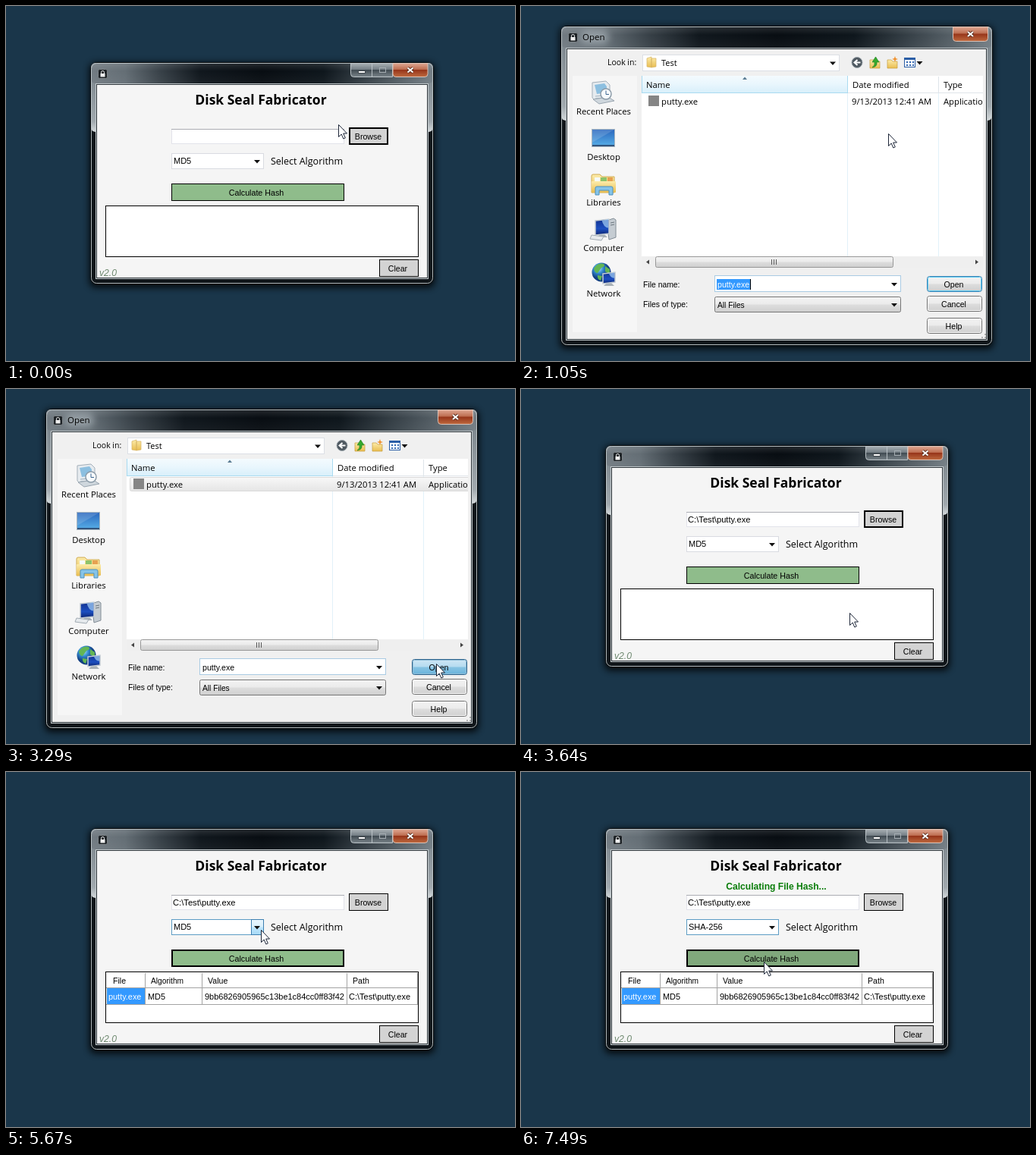
These frames come from a looping animation (671x468 px, 8000 ms). An HTML page:

```html
<!DOCTYPE html>
<html lang="en">
<head>
<meta charset="utf-8">
<title>Disk Seal Fabricator</title>
<style>
  html, body { margin: 0; height: 100%; overflow: hidden; background: #1a364a; }
  svg { display: block; width: 100%; height: 100%; }
  text { font-family: "Liberation Sans", Arial, sans-serif; white-space: pre; }
  .ui { font-family: "Open Sans", "Noto Sans", sans-serif; }
</style>
</head>
<body>
<svg id="stage" viewBox="0 0 671 468"></svg>
<script>
const STEP = 70, LOOP = 8000;

// Markup helpers
const rect = (x, y, w, h, fill, extra = '') =>
  `<rect x="${x}" y="${y}" width="${w}" height="${h}" fill="${fill}" ${extra}/>`;
const box = (x, y, w, h, fill, stroke, extra = '') =>
  rect(x + .5, y + .5, w - 1, h - 1, fill, `stroke="${stroke}" ${extra}`);
const path = (d, fill, extra = '') => `<path d="${d}" fill="${fill}" ${extra}/>`;
const line = (d, stroke, width = 1) => path(d, 'none', `stroke="${stroke}" stroke-width="${width}"`);
const text = (x, y, str, size = 10.6, extra = '') =>
  `<text x="${x}" y="${y}" font-size="${size}" ${extra}>${str}</text>`;
const ui = (x, y, str, size = 11.25, extra = '') => text(x, y, str, size, `class="ui" ${extra}`);
const mid = 'text-anchor="middle"';
const group = (id, body, extra = '') => `<g id="${id}" ${extra}>${body}</g>`;
const arrow = (x, y) => path(`M${x} ${y}h8l-4 4.5z`, '#111');
const gradient = (id, stops, vertical = true) =>
  `<linearGradient id="${id}" x2="${vertical ? 0 : 1}" y2="${vertical ? 1 : 0}">` +
  stops.map(([at, color, opacity = 1]) =>
    `<stop offset="${at}" stop-color="${color}" stop-opacity="${opacity}"/>`).join('') +
  '</linearGradient>';

const defs = `<defs>
  ${gradient('glass', [[0, '#727b82'], [.1, '#646e75'], [.2, '#394249'], [.32, '#10171d'],
    [.5, '#080d12'], [.68, '#0e161c'], [.8, '#343e45'], [1, '#747e85']], false)}
  ${gradient('sheen', [[0, '#fff', .12], [.4, '#fff', 0], [1, '#fff', .04]])}
  ${gradient('shine', [[0, '#747e85'], [.85, '#a1a9ae'], [1, '#d5dadc']])}
  ${gradient('red', [[0, '#e0a893'], [.45, '#bd6d50'], [.5, '#97351a'], [1, '#bf6a3f']])}
  ${gradient('caption', [[0, '#aab1b5'], [.45, '#747e85'], [.5, '#424c53'], [1, '#7a848a']])}
  ${gradient('button', [[0, '#f3f3f3'], [.48, '#ebebeb'], [.52, '#dddddd'], [1, '#cfcfcf']])}
  ${gradient('hot', [[0, '#eaf6fd'], [.48, '#d9f0fc'], [.52, '#bee6fd'], [1, '#a7d9f5']])}
  ${gradient('pressed', [[0, '#cfe7f5'], [.48, '#b5dbf0'], [.52, '#87c3e3'], [1, '#68b3db']])}
  ${gradient('picked', [[0, '#dcebfc'], [1, '#c1dbfc']])}
  ${gradient('hover', [[0, '#fafbfd'], [1, '#ebf3fd']])}
  ${gradient('idle', [[0, '#f8f8f8'], [1, '#e5e5e5']])}
  ${gradient('sorted', [[0, '#f4fbfe'], [.5, '#e9f6fd'], [1, '#d8effa']])}
  ${gradient('folder', [[0, '#fcecab'], [1, '#e9bd50']])}
  ${gradient('screen', [[0, '#2a66bd'], [1, '#58b0e8']])}
  ${gradient('night', [[0, '#12318f'], [.6, '#1c4fc0'], [1, '#0c2470']])}
  <radialGradient id="globe" cx=".35" cy=".3"><stop stop-color="#b5e6fa"/>
    <stop offset=".5" stop-color="#338bd0"/><stop offset="1" stop-color="#123f83"/></radialGradient>
  <filter id="blur" x="-20%" y="-20%" width="140%" height="140%"><feGaussianBlur stdDeviation="5"/></filter>
  <clipPath id="list">${rect(159, 92, 450, 254, '#000')}</clipPath>
</defs>`;

// The side borders are bright down to the reflection's end, dark below it
function glassWindow(x, y, w, h, top, reflection, fill) {
  const cx = x + 6, cy = y + top, cw = w - 12, ch = h - top - 6;
  return rect(x - 2, y, w + 4, h + 5, '#000', 'rx="8" opacity=".85" filter="url(#blur)"') +
    box(x - 1, y - 1, w + 2, h + 2, '#11161a', '#05080a', 'rx="8"') +
    rect(x, y, w, reflection, 'url(#shine)', 'rx="6"') +
    rect(x, y, w, top, 'url(#glass)', 'rx="6"') +
    rect(x, y, w, top, 'url(#sheen)', 'rx="6"') +
    box(x, y, w, h, 'none', '#c3cbcf', 'rx="7" opacity=".9"') +
    box(cx, cy, cw, ch, fill, '#c2c9cc') +
    box(cx + 1, cy + 1, cw - 2, ch - 2, fill, '#30373c');
}

const lockIcon = (x, y) =>
  box(x, y, 13, 13, '#1d2226', '#7e8488', 'rx="2"') +
  line(`M${x + 4.5} ${y + 6}v-1.5a2 2 0 0 1 4 0v1.5`, '#eee') +
  rect(x + 3.5, y + 6, 6, 4.5, '#eee');

function closeButton(x, y, w, h) {
  const cross = `M${x + w / 2 - 3.5} ${y + h / 2 - 3}l7 6m0-6l-7 6`;
  return path(`M${x} ${y}h${w}v${h - 4}q0 4-4 4h${8 - w}q-4 0-4-4z`, 'url(#red)', 'stroke="#d8c2b8"') +
    line(cross, '#5c3020', 4) + line(cross, '#fff', 2);
}

const mainWindow =
  glassWindow(112, 75, 451, 291, 27, 91, '#f5f5f5') +
  lockIcon(121, 83) +
  path('M454.500 75.500h55v18h-51q-4 0-4-4z', 'url(#caption)', 'stroke="#b9c1c5"') +
  line('M482.500 76v17', '#b9c1c5') +
  box(464, 85, 10, 4, '#fff', '#434a50') +
  box(492, 81, 9, 7, 'none', '#a5adb2') +
  closeButton(510, 75.5, 46, 18) +
  ui(336, 130, 'Disk Seal Fabricator', 17.5, `${mid} font-weight="700"`) +
  group('status', text(336.5, 155, 'Calculating File Hash...', 12.1, `${mid} font-weight="700" fill="#0a7d0a"`)) +
  box(218, 162, 228, 20, '#fff', '#e2e3ea') + line('M218 162.500h228', '#abadb3') +
  group('filePath', text(220, 176, 'C:\\Test\\putty.exe', 11.2)) +
  box(452, 160, 52, 23, '#d3d3d3', '#000', 'id="browse"') +
  text(477.5, 176, 'Browse', 10.6, mid) +
  box(218, 194, 122, 21, '#fff', '#d9dbe1', 'id="combo"') +
  group('comboHot', box(323, 194, 17, 21, 'url(#hot)', '#3c7fb1')) +
  arrow(327, 203) +
  text(221, 208, 'MD5', 11, 'id="algorithm"') +
  group('caret', rect(244, 197, 1, 13, '#000')) +
  ui(349, 209, 'Select Algorithm', 12.5) +
  box(218, 234, 228, 23, '#8fbc8b', '#000', 'id="calculate"') +
  text(330, 250, 'Calculate Hash', 10.7, mid) +
  box(131, 263, 413, 68, '#fff', '#000') +
  group('table',
    line('M132 284.500h410M132 306.500h410M183.500 265v42M258.500 265v42M449.500 265v42M542.500 265v42', '#a3a3a3') +
    rect(133, 285, 50, 21, '#3399ff') +
    text(141, 279, 'File') + text(191, 279, 'Algorithm', 10.2) + text(266, 279, 'Value') + text(457, 279, 'Path') +
    text(135, 300, 'putty.exe', 10.9, 'fill="#fff"') + text(187, 300, 'MD5', 10.9) +
    text(262, 300, '9bb6826905965c13be1c84cc0ff83f42', 11) + text(452, 300, 'C:\\Test\\putty.exe', 11)) +
  text(123, 356, 'v2.0', 12.2, 'font-style="italic" fill="#6f8a70"') +
  box(492, 334, 52, 23, '#d3d3d3', '#000') + text(516.5, 350, 'Clear', 10.6, mid) +
  group('dropdown',
    rect(222, 218, 122, 55, '#000', 'opacity=".28"') +
    box(218, 215, 122, 54, '#fff', '#000') +
    rect(219, 216, 120, 13, '#3399ff', 'id="choice"') +
    ['MD5', 'SHA-1', 'SHA-256', 'SHA-512'].map((name, i) =>
      text(221, 226.5 + 13 * i, name, 11, 'class="option"')).join(''));

const monitor = (x, y, w, h) =>
  path(`M${x + w / 2 - 3} ${y + h}h6l4 4h-14z`, '#a9b1b7') +
  path(`M${x} ${y + 1}l${w}-2v${h}l${-w} 2z`, 'url(#night)', 'stroke="#c3ccd3" stroke-width="1.500"') +
  path(`M${x + w * .45} ${y + 1}l${w * .5}-2v${h * .6}q${-w * .35} 0${-w * .5}${-h * .6}z`, '#9cc8f3', 'opacity=".75"');

const places =
  // Recent places
  path('M94 101l18-2 5 5v20l-18 2-5-5z', '#e6ebef', 'stroke="#a3afb9"') +
  path('M97 104l13-2 3 4v8l-13 2z', '#8cbfe0') + line('M98 119l12-1M98 122l10-1', '#9fb0bd') +
  path('M95 123l20-3 8 5-20 4z', '#cfd7dd', 'stroke="#9aa6b0"') +
  '<circle cx="112" cy="116" r="7" fill="#f7fbfd" stroke="#8c9ba8" stroke-width="1.500"/>' +
  line('M112 111.500v5h4', '#3c6690') +
  // Desktop
  box(93, 162, 31, 24, 'url(#screen)', '#a9b6c0') + path('M94 163h29L94 180z', '#fff', 'opacity=".15"') +
  rect(94, 183, 29, 2, '#31547d') +
  // Libraries
  path('M93 224q0-2 2-2h9l3 3h16v21H93z', 'url(#folder)', 'stroke="#d0ab50"') +
  rect(97, 226, 7, 10, '#f5fafc') + rect(105, 226, 8, 10, '#8ec36a') + rect(114, 226, 7, 10, '#e7a150') +
  rect(93, 231, 32, 15, 'url(#folder)', 'rx="1"') +
  path('M98 249v-9q0-2 2-2h19q2 0 2 2v9h-5v-6h-13v6z', '#86c4e8', 'stroke="#4d90bd"') +
  // Computer
  path('M113 283l9-3 3 2v23l-9 3z', '#c5ccd2', 'stroke="#828d96"') + line('M118 286l5-1m-5 4l5-1', '#69747c') +
  monitor(98, 282, 18, 19) + path('M93 302l16 2-3 5-15-2z', '#e6eaed', 'stroke="#a1abb3"') +
  // Network
  '<circle cx="106" cy="351" r="12.500" fill="url(#globe)"/>' +
  path('M96 346q5-8 13-6 3 3-3 5l-5 7q-4 0-5-6zM111 343l6 4v7l-6-4zM101 355l6 1-2 6q-5-2-4-7z', '#63b654') +
  monitor(108, 352, 16, 13) +
  ['Recent Places', 'Desktop', 'Libraries', 'Computer', 'Network'].map((name, i) =>
    ui(109, 143 + 60 * i, name, 11.3, mid)).join('');

const folder = (x, y) => path(`M${x} ${y}h5l2 2h6v9h-13z`, 'url(#folder)', 'stroke="#c69b3c" stroke-width=".7"');
const button = (id, y, label) =>
  box(535, y, 73, 21, 'url(#button)', '#707070', `rx="3" id="${id}"`) +
  box(536, y + 1, 71, 19, 'none', '#fcfcfc', `rx="2" id="${id}Rim"`) +
  text(570.5, y + 15, label, 10.6, mid);

const dialog =
  glassWindow(53, 27, 568, 420, 28, 124, '#f0f0f0') +
  rect(78, 32, 38, 18, '#b9c2c8', 'rx="9" opacity=".55" filter="url(#blur)"') +
  lockIcon(62, 35) + ui(81, 45, 'Open', 11.5) + closeButton(569.5, 27.5, 46, 19) +
  ui(114, 78, 'Look in:', 10.5) +
  box(160, 64, 260, 22, '#fff', '#dcdfe5') + arrow(407, 73.5) +
  path('M166 69l6-2v14l-6-1zM172 69h6v11l-6 1z', 'url(#folder)', 'stroke="#d6b463" stroke-width=".7"') +
  ui(185, 79, 'Test', 11) +
  '<circle cx="443" cy="74.500" r="7" fill="#4e5860" stroke="#9aa3aa"/>' +
  line('M447.500 74.500h-8m4-3.500l-4 3.500 4 3.500', '#fff', 2) +
  folder(460, 71) + path('M463 81q4-3 3-7h-3l4.500-7 4.500 7h-3q1 6-6 7z', '#35a92e', 'stroke="#1c7d1c" stroke-width=".6"') +
  folder(483, 71) + path('M493 66l1 3 3 1-3 1-1 3-1-3-3-1 3-1z', '#f0902c') +
  box(505, 68, 15, 13, '#fff', '#2b5ea6') + rect(505, 68, 15, 3, '#2b5ea6') +
  [508, 512, 516].map(x => rect(x, 73, 2, 2, '#2f65b0') + rect(x, 77, 2, 2, '#2f65b0')).join('') +
  arrow(521.5, 73) +
  rect(68, 92, 85, 338, '#f6f6f6') + places +
  rect(159, 92, 450, 254, '#fff') +
  `<g clip-path="url(#list)">` +
    box(159, 91, 272, 24, 'url(#sorted)', '#a9daf0') +
    line('M431 114.500h178', '#e0e4e9') + line('M550.500 93v21', '#dde4ea') +
    line('M430.500 115v215M550.500 115v215', '#e2f1f9') +
    path('M292 97l3-3.500 3 3.500z', '#5a7b92') +
    ui(165, 108, 'Name') + ui(437, 108, 'Date modified') + ui(557, 108, 'Type') +
    box(163, 116, 470, 19, 'none', 'none', 'rx="2" id="row"') +
    rect(168, 118, 14, 14, '#858585') +
    ui(185, 130, 'putty.exe') + ui(436, 130, '9/13/2013 12:41 AM') + ui(557, 130, 'Application') +
  '</g>' +
  rect(159, 330, 450, 16, '#efefef') +
  path('M169 334.500v6l-4-3zM599 334.500v6l4-3z', '#444') +
  box(177, 330, 314, 15, 'url(#button)', '#979797', 'rx="2"') +
  line('M330.500 334v7M333.500 334v7M336.500 334v7', '#555') +
  text(161, 371, 'File name:', 10.4) + text(161, 397, 'Files of type:', 10.4) +
  box(255, 355, 246, 22, '#fff', '#a9cbe3') + arrow(488, 365) +
  group('selection', rect(258, 360, 44, 14, '#3399ff')) +
  text(259, 371, 'putty.exe', 10.6, 'id="fileName"') +
  group('fileCaret', rect(302, 360, 1, 14, '#000')) +
  box(255, 383, 246, 21, 'url(#button)', '#777', 'rx="2"') + text(259, 398, 'All Files', 10.2) + arrow(488, 392) +
  button('open', 356, 'Open') + button('cancel', 382, 'Cancel') + button('help', 411, 'Help') +
  [[611, 432], [611, 436], [607, 436]].map(([x, y]) => rect(x, y, 2, 2, '#b4b4b4')).join('');

const stage = document.getElementById('stage');
stage.innerHTML = defs + rect(0, 0, 671, 468, '#1a364a') +
  mainWindow + group('dialog', dialog) +
  group('cursor', path('M.5 .5V16.500L4.200 13L6.800 19L9.300 17.900L6.700 12H11.500Z', '#fff',
    'stroke="#1d2638" stroke-linejoin="round"'));

const $ = id => document.getElementById(id);
const set = (id, attrs) => { for (const name in attrs) $(id).setAttribute(name, attrs[name]); };
const show = (id, on) => set(id, { visibility: on ? 'inherit' : 'hidden' });
const within = (t, from, to) => t >= from && t < to;

// Pointer route: time, x, y
const route = [
  [0, 438, 156], [350, 486, 172], [490, 486, 172], [770, 484, 168], [1470, 484, 168],
  [1680, 479, 171], [1750, 479, 171], [2240, 302, 128], [2590, 302, 128], [3150, 567, 362],
  [3290, 567, 362], [3360, 561, 352], [3500, 561, 352], [3640, 433, 295], [3780, 433, 295],
  [4130, 360, 250], [5320, 360, 250], [5670, 336, 208], [5810, 336, 208], [6160, 319, 237],
  [6230, 319, 238], [6370, 317, 240], [6510, 317, 240], [6720, 316, 246], [7000, 316, 246],
  [7210, 320, 250], [LOOP, 320, 250]
];

function pointer(t) {
  const i = route.findIndex(stop => stop[0] > t);
  const [t0, x0, y0] = route[i - 1], [t1, x1, y1] = route[i];
  const p = (t - t0) / (t1 - t0), ease = p * p * (3 - 2 * p);
  return [x0 + (x1 - x0) * ease, y0 + (y1 - y0) * ease].map(Math.round);
}

// Flat buttons grow a second pixel of border inwards when focused
function flatButton(id, x, y, w, h, focused, fill) {
  const inset = focused ? 1 : .5;
  set(id, { x: x + inset, y: y + inset, width: w - 2 * inset, height: h - 2 * inset,
    'stroke-width': 2 * inset, fill });
}

function draw(t) {
  const [x, y] = pointer(t);
  const over = (l, top, r, b) => x >= l && x < r && y >= top && y < b;
  set('cursor', { transform: `translate(${x} ${y})` });

  const overBrowse = over(452, 160, 504, 183) && t < 910;
  flatButton('browse', 452, 160, 52, 23, t < 4270,
    within(t, 630, 770) ? '#a9a9a9' : overBrowse ? '#bdbdbd' : '#d3d3d3');
  const overCalculate = over(218, 234, 446, 257) && !within(t, 5810, 7000);
  flatButton('calculate', 218, 234, 228, 23, t >= 4270, overCalculate ? '#80a87c' : '#8fbc8b');

  show('filePath', t >= 3360);
  show('status', within(t, 4410, 5040) || t >= 7490);
  show('table', t >= 5040);

  const comboActive = t >= 5600;
  show('comboHot', within(t, 5600, 7000));
  set('combo', { stroke: comboActive ? '#5c9cc4' : '#d9dbe1' });
  $('algorithm').textContent = t < 7000 ? 'MD5' : 'SHA-256';
  show('caret', within(t, 5810, 6300) || within(t, 6860, 7000));
  show('dropdown', within(t, 5810, 7000));
  const choice = Math.max(0, Math.min(3, Math.floor((y - 216) / 13)));
  set('choice', { y: 216 + 13 * choice });
  document.querySelectorAll('.option').forEach((option, i) =>
    option.setAttribute('fill', i === choice ? '#fff' : '#000'));

  show('dialog', within(t, 910, 3360));
  const opened = Math.max(0, Math.min(1, (t - 840) / 210)), scale = .95 + .05 * opened;
  set('dialog', { opacity: opened,
    transform: `translate(337 237) scale(${scale}) translate(-337 -237)` });
  const picked = t >= 2310, pressed = t >= 3220;
  const [rowFill, rowStroke] = pressed ? ['url(#idle)', '#d9d9d9']
    : picked ? ['url(#picked)', '#7da2ce']
    : over(163, 116, 609, 135) ? ['url(#hover)', '#b8d6fb'] : ['none', 'none'];
  set('row', { fill: rowFill, stroke: rowStroke });
  show('selection', !picked);
  set('fileName', { fill: picked ? '#000' : '#fff' });
  show('fileCaret', !picked && !within(t, 1540, 2070));
  set('open', { stroke: pressed ? '#2c628b' : '#3c7fb1',
    fill: `url(#${pressed ? 'pressed' : picked ? 'hot' : 'button'})` });
  set('openRim', { stroke: pressed ? '#8fbcd6' : '#5fd0f5' });
}

function tick() {
  draw(Math.floor(performance.now() % LOOP / STEP) * STEP);
  requestAnimationFrame(tick);
}
tick();
</script>
</body>
</html>
```
